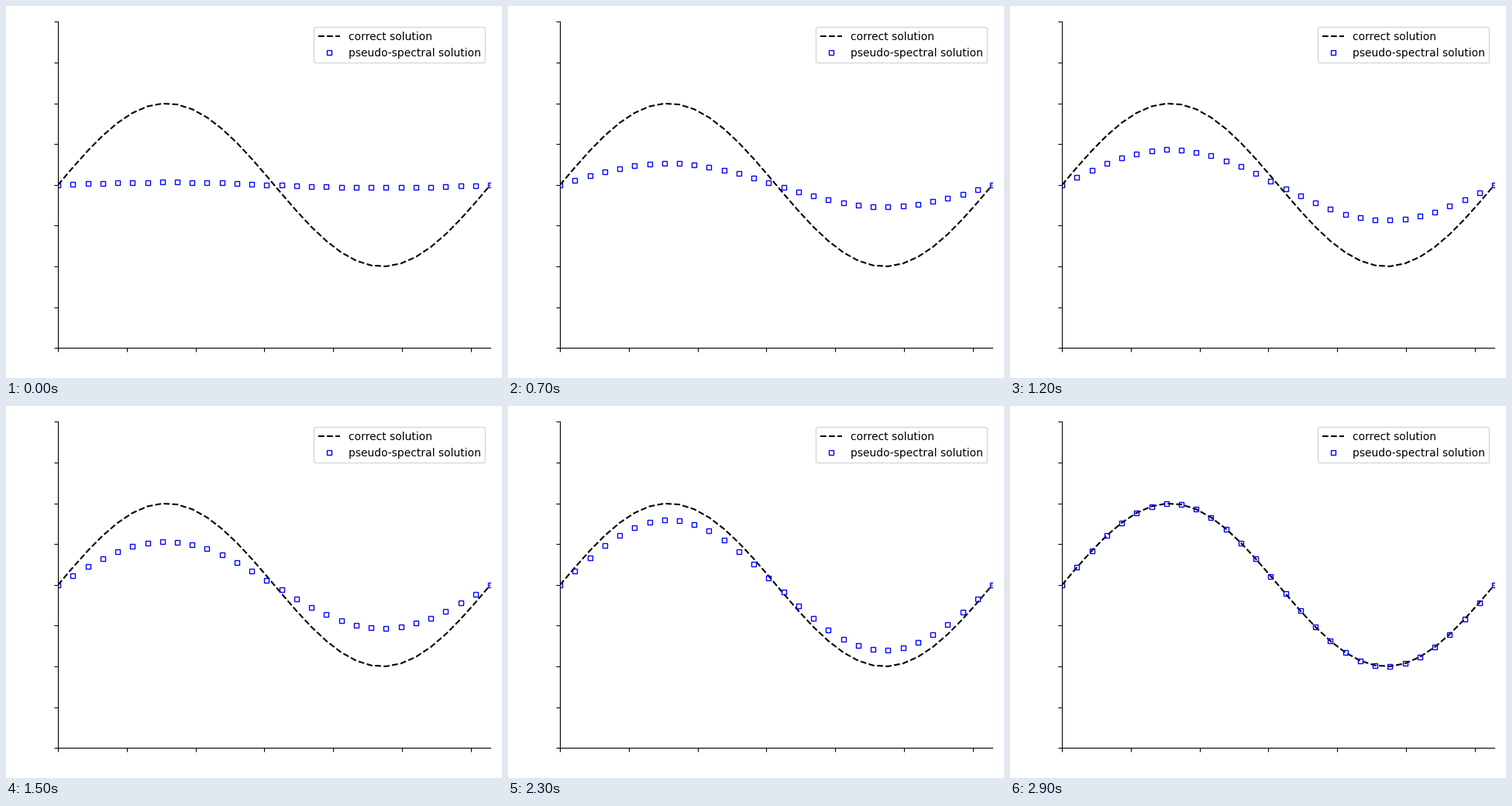
Recreate the animation shown at these times as a matplotlib script. Size 640 px wide and 480 px high, loop 3 s.

```python
import numpy as np
import matplotlib.pyplot as plt
from matplotlib.animation import FuncAnimation

STEPS = 30
INTERVAL = 100  # ms

x = np.linspace(0, 2 * np.pi, 30)
wave = 0.5 * np.sin(x)

fig, ax = plt.subplots(figsize=(6.4, 4.8), dpi=100)
ax.plot(x, wave, "k--", label="correct solution")
squares, = ax.plot(x, wave / STEPS, "s", color="blue", markersize=4,
                   markerfacecolor="none", label="pseudo-spectral solution")

ax.set_xlim(0, 2 * np.pi)
ax.set_ylim(-1, 1)
ax.set_yticks(np.linspace(-1, 1, 9))
ax.spines[["top", "right"]].set_visible(False)
ax.legend(loc="upper right")

# Invisible tick labels still reserve their margin in the layout.
ax.tick_params(labelcolor="none")
fig.tight_layout()


def update(step):
    squares.set_ydata(wave * (step + 1) / STEPS)
    return squares,


anim = FuncAnimation(fig, update, frames=STEPS, interval=INTERVAL,
                     repeat=True, repeat_delay=0)
plt.show()
```
